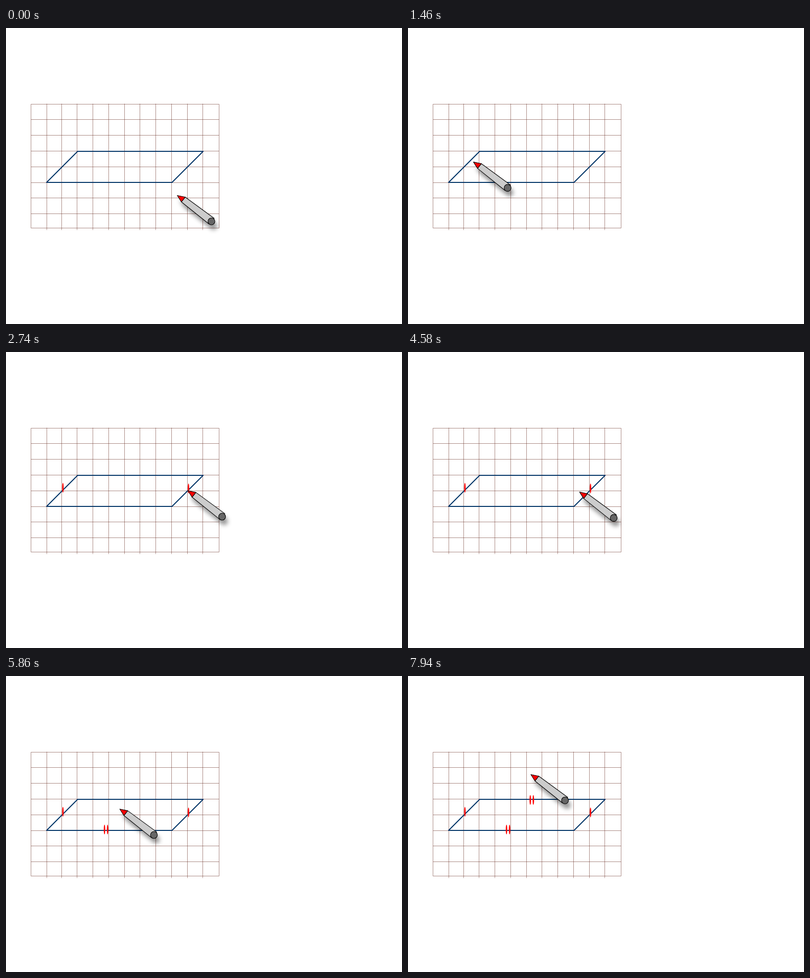
Animation of 800x600 px, one loop 8 s. Source, as an HTML page with a canvas:

```html
<!DOCTYPE html>
<html lang="en">
<head>
<meta charset="utf-8">
<title>Parallelogram sides</title>
<style>
  html, body { margin: 0; width: 100%; height: 100%; overflow: hidden; background: #fff; }
  canvas { display: block; }
</style>
</head>
<body>
<canvas id="stage" width="800" height="600"></canvas>
<script>
const ctx = document.getElementById('stage').getContext('2d');
const LOOP = 8000, STEP = 80, PHASE = 20;
const PAUSE = 2 * STEP;                  // between reaching a side and ticking it
const TICK_START = -9.3, TICK_END = 4.8; // pen tip relative to the tick's centre

const home = { x: 346, y: 339.5 };
const exit = { leave: 6660, travel: 1280, x: 248.2, y: 199.7 };
const sides = [
  { leave: 500, travel: 1040, x: 114.4, y: 275.3, ticks: [115] },
  { leave: 1860, travel: 720, x: 367.6, y: 276.5, ticks: [368.7] },
  { leave: 4500, travel: 640, x: 199.6, y: 311.3, ticks: [199, 205.2] },
  { leave: 5460, travel: 640, x: 248, y: 251.3, ticks: [247, 253.2] }
];
const tickTime = side => side.leave + side.travel + PAUSE;

function glide(from, to, k) {
  k = Math.min(Math.max(k, 0), 1);
  return { x: from.x + (to.x - from.x) * k, y: from.y + (to.y - from.y) * k };
}

function penTip(t) {
  const travelled = move => (t - move.leave) / move.travel;
  let tip = home;
  for (const side of sides) {
    if (t < side.leave) return tip;
    const offset = t < tickTime(side) ? TICK_START : TICK_END;
    tip = glide(tip, { x: side.x, y: side.y + offset }, travelled(side));
  }
  return glide(tip, exit, travelled(exit));
}

function polygon(...points) {
  const path = new Path2D();
  points.forEach(([x, y]) => path.lineTo(x, y));
  path.closePath();
  return path;
}

function disc(x, y, rx, ry = rx) {
  const path = new Path2D();
  path.ellipse(x, y, rx, ry, 0, 0, Math.PI * 2);
  return path;
}

const outline = polygon([144.7, 250], [398.3, 250], [335.4, 313], [82, 313]);
const cone = polygon([0, 0], [16, 3.3], [8.3, 13]);
const body = polygon([16, 3.3], [74.5, 46.3], [64, 57.8], [8.3, 13]);
const cap = disc(69, 52.5, 7);
const silhouette = new Path2D();
[cone, body, cap].forEach(part => silhouette.addPath(part));

function line(x0, y0, x1, y1) {
  ctx.beginPath();
  ctx.moveTo(x0 + .5, y0 + .5);
  ctx.lineTo(x1 + .5, y1 + .5);
  ctx.stroke();
}

function drawGrid() {
  ctx.lineWidth = 1;
  ctx.strokeStyle = 'rgba(100, 40, 30, .55)';
  for (let i = 0; i <= 8; i++) {
    const y = Math.min(405, Math.round(153.5 + 31.8 * i));
    line(50, y, 430, y);
  }
  [50, 430].forEach(x => line(x, 154, x, 405));
  line(82, 153, 82, 409);
  for (let i = 1; i <= 10; i++) {
    const x = Math.round(79.75 + 31.75 * i);
    line(x, 153, x, 409);
  }
}

function drawPen({ x, y }) {
  ctx.save();
  ctx.translate(x, y);
  ctx.save();
  ctx.shadowColor = 'rgba(0, 0, 0, .42)';
  ctx.shadowBlur = 8;
  ctx.shadowOffsetX = 4.5;
  ctx.shadowOffsetY = 10;
  ctx.fillStyle = '#ccc';
  ctx.fill(silhouette);
  ctx.restore();
  ctx.lineWidth = 1.1;
  ctx.strokeStyle = '#000';
  [[body, '#ccc'], [cone, '#f00'], [cap, '#666']].forEach(([path, color]) => {
    ctx.fillStyle = color;
    ctx.fill(path);
    ctx.stroke(path);
  });
  ctx.restore();
}

function draw(now) {
  const t = Math.floor((now % LOOP - PHASE) / STEP) * STEP + PHASE;
  ctx.fillStyle = '#fff';
  ctx.fillRect(0, 0, 800, 600);
  ctx.lineJoin = 'round';
  drawGrid();
  ctx.lineWidth = 2;
  ctx.strokeStyle = '#036';
  ctx.stroke(outline);
  ctx.fillStyle = '#f00';
  for (const side of sides) {
    if (t >= tickTime(side)) side.ticks.forEach(x => ctx.fill(disc(x, side.y, 1.5, 10)));
  }
  drawPen(penTip(t));
  requestAnimationFrame(draw);
}
draw(performance.now());
</script>
</body>
</html>
```
